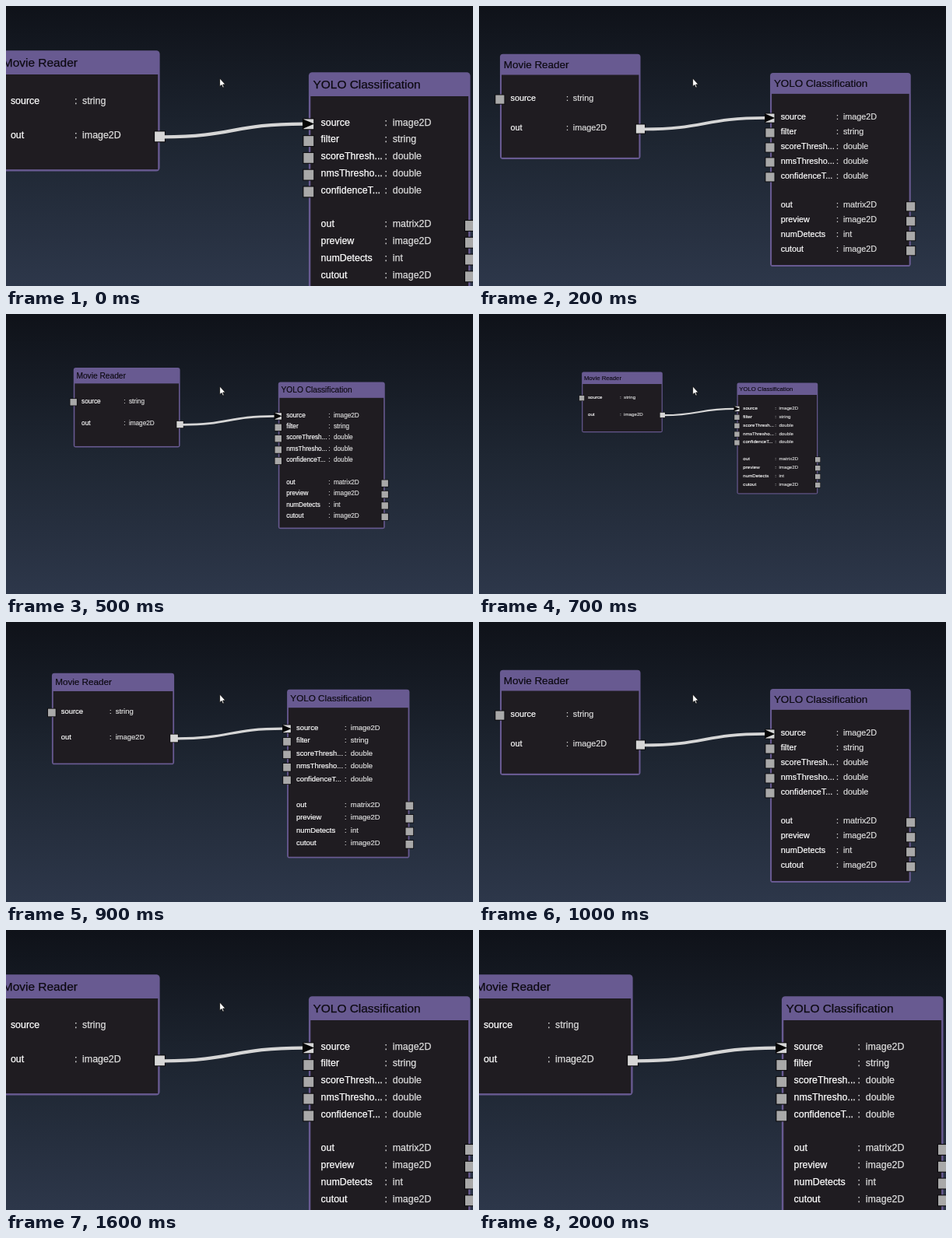
An HTML page with a canvas that plays this animation: 600x360 px, repeating every 2100 ms.

```html
<!DOCTYPE html>
<html lang="en">
<head>
<meta charset="utf-8">
<title>Node graph zoom</title>
<style>
  html, body { margin: 0; width: 600px; height: 360px; overflow: hidden; background: #10131b; }
  canvas { display: block; }
</style>
</head>
<body>
<canvas id="stage" width="600" height="360"></canvas>
<script>
const ctx = document.getElementById('stage').getContext('2d');
const STEP = 100, LOOP = 2100, CURSOR_GONE = 1900;
const FOCUS = { x: 274, y: 92 };
// Wheel notches zoomed out at each step; five notches halve the scale.
const NOTCHES = [0, 1, 1, 2, 2, 3, 4, 5, 4, 2, 1, 1, 1, 0];

const FONT = '"Liberation Sans", Arial, sans-serif';
const LIGHT = '#d6d6d6', GREY = '#a9a9a9', PURPLE = '#685a91';
const ROW = 21.78;

// Each row: line index, label, type, port side, connected
const nodes = [
  { title: 'Movie Reader', x: -9.8, y: 57.2, w: 207.4, h: 155.3, first: 124.2, rows: [
    [0, 'source', 'string', 'in'],
    [2, 'out', 'image2D', 'out', true]
  ] },
  { title: 'YOLO Classification', x: 388.9, y: 85.2, w: 207.6, h: 286, first: 151.7, rows: [
    [0, 'source', 'image2D', 'in', true],
    [1, 'filter', 'string', 'in'],
    [2, 'scoreThresh...', 'double', 'in'],
    [3, 'nmsThresho...', 'double', 'in'],
    [4, 'confidenceT...', 'double', 'in'],
    [6, 'out', 'matrix2D', 'out'],
    [7, 'preview', 'image2D', 'out'],
    [8, 'numDetects', 'int', 'out'],
    [9, 'cutout', 'image2D', 'out']
  ] }
];

const sky = ctx.createLinearGradient(0, 0, 0, 360);
sky.addColorStop(0, '#0f1219');
sky.addColorStop(0.5, '#1e2632');
sky.addColorStop(1, '#2d374a');

// A hairline stroke gives the slightly heavier text weight.
function text(str, x, y, size, color) {
  ctx.font = size + 'px ' + FONT;
  ctx.fillStyle = ctx.strokeStyle = color;
  ctx.lineWidth = 0.25;
  ctx.fillText(str, x, y);
  ctx.strokeText(str, x, y);
}

function polygon(points, fill, stroke) {
  ctx.beginPath();
  points.forEach(([x, y]) => ctx.lineTo(x, y));
  ctx.closePath();
  ctx.fillStyle = fill;
  ctx.fill();
  if (stroke) {
    ctx.strokeStyle = stroke;
    ctx.stroke();
  }
}

function port(x, y, color) {
  ctx.fillStyle = '#0c0b0e';
  ctx.fillRect(x - 7.6, y - 7.4, 15, 15);
  ctx.fillStyle = color;
  ctx.fillRect(x - 6.5, y - 6.3, 12.8, 12.8);
}

function drawNode({ title, x, y, w, h, first, rows }) {
  ctx.fillStyle = PURPLE;
  ctx.beginPath();
  ctx.roundRect(x, y, w, h, 4.5);
  ctx.fill();
  ctx.fillStyle = '#1f1c21';
  ctx.fillRect(x + 2.4, y + 30.8, w - 4.8, h - 33.2);
  text(title, x + 5.6, y + 20.6, 15.45, '#0d0a12');

  for (const [line, label, type, side, linked] of rows) {
    const cy = first + line * ROW;
    text(label, x + 15.7, cy + 2, 12.4, '#fff');
    text(':', x + 97.7, cy + 2, 12.4, '#d8d8d8');
    text(type, x + 107.9, cy + 2, 12.4, '#dcdcdc');
    port(side === 'in' ? x : x + w, cy, linked ? LIGHT : GREY);
  }
}

function drawWire() {
  ctx.beginPath();
  ctx.moveTo(202, 168.3);
  ctx.bezierCurveTo(292, 168.3, 292, 151.6, 382, 151.6);
  ctx.lineWidth = 4.3;
  ctx.strokeStyle = LIGHT;
  ctx.stroke();
  polygon([[381, 145.2], [396, 151.6], [381, 158]], '#060606');
}

function drawCursor() {
  ctx.lineWidth = 0.8;
  polygon([[274.6, 92.9], [274.6, 103.6], [277, 101.5], [278.6, 105.1],
    [280.2, 104.4], [278.6, 101], [281.8, 100.8]], '#fff', '#101010');
}

function draw() {
  const t = performance.now() % LOOP;
  const level = NOTCHES[Math.floor(t / STEP)] || 0;
  const scale = 2 ** (-level / 5);

  ctx.fillStyle = sky;
  ctx.fillRect(0, 0, 600, 360);

  ctx.save();
  ctx.translate(FOCUS.x, FOCUS.y);
  ctx.scale(scale, scale);
  ctx.translate(-FOCUS.x, -FOCUS.y);
  nodes.forEach(drawNode);
  drawWire();
  ctx.restore();

  if (t < CURSOR_GONE) drawCursor();
  requestAnimationFrame(draw);
}

draw();
</script>
</body>
</html>
```
